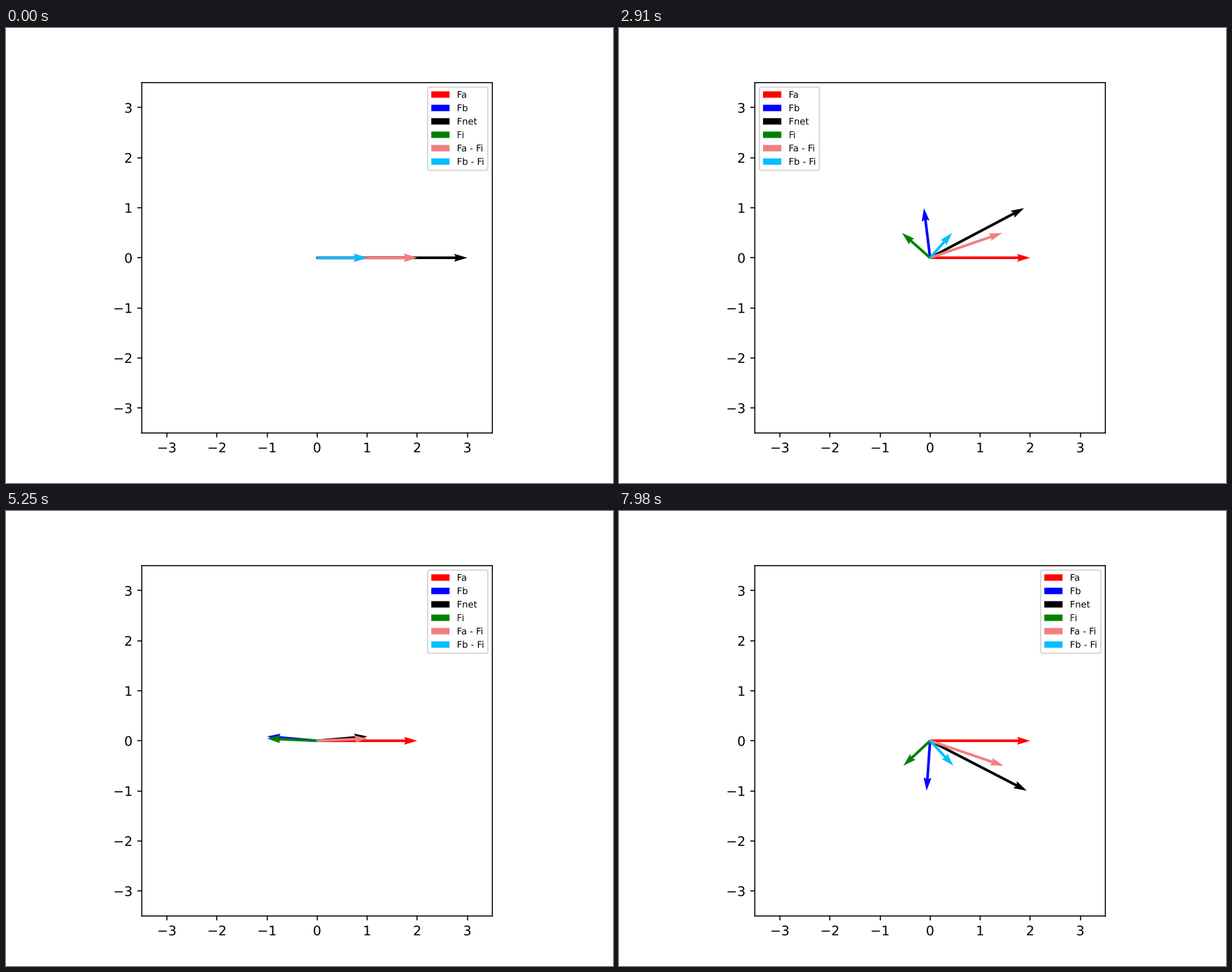
A matplotlib script that plays this animation: 864x648 px, repeating every 8 s.

```python
import numpy as np
import matplotlib.pyplot as plt
from matplotlib.animation import FuncAnimation
from matplotlib.patheffects import Normal

LOOP_MS = 8000
STEPS = 267                 # the second force turns one degree per step
LEGEND_LEFT = range(50, 119)  # steps during which the legend sits on the left

FORCES = [
    ("Fa", "red"),
    ("Fb", "blue"),
    ("Fnet", "black"),
    ("Fi", "green"),
    ("Fa - Fi", "lightcoral"),
    ("Fb - Fi", "deepskyblue"),
]

# Smooth sub-pixel edges: no snapping, unhinted text drawn as outlines.
plt.rcParams.update({
    "path.snap": False,
    "path.effects": [Normal()],
    "text.hinting": "none",
})


def vectors(step):
    """Force vectors at a step, in the order of FORCES."""
    angle = np.radians(step)
    fa = np.array([2.0, 0.0])
    fb = np.array([np.cos(angle), np.sin(angle)])
    fi = (fb - [1.0, 0.0]) / 2
    return fa, fb, fa + fb, fi, fa + fi, fb - fi


fig, ax = plt.subplots(figsize=(6.4, 4.8), dpi=135)
ax.set_aspect("equal")
ax.set_xlim(-3.5, 3.5)
ax.set_ylim(-3.5, 3.5)
ax.set_xticks(range(-3, 4))
ax.set_yticks(range(-3, 4))

arrows = [
    ax.quiver([0], [0], [v[0]], [v[1]], color=color, label=label,
              angles="xy", scale_units="xy", scale=1)
    for (label, color), v in zip(FORCES, vectors(0))
]
legend = ax.legend(loc="upper right", fontsize="x-small")


def update(step):
    for arrow, v in zip(arrows, vectors(step)):
        arrow.set_UVC([v[0]], [v[1]])
    legend.set_loc("upper left" if step in LEGEND_LEFT else "upper right")
    return [*arrows, legend]


anim = FuncAnimation(fig, update, frames=STEPS, interval=LOOP_MS / STEPS,
                     init_func=lambda: update(0), repeat=True,
                     repeat_delay=0, blit=False)
plt.show()
```
